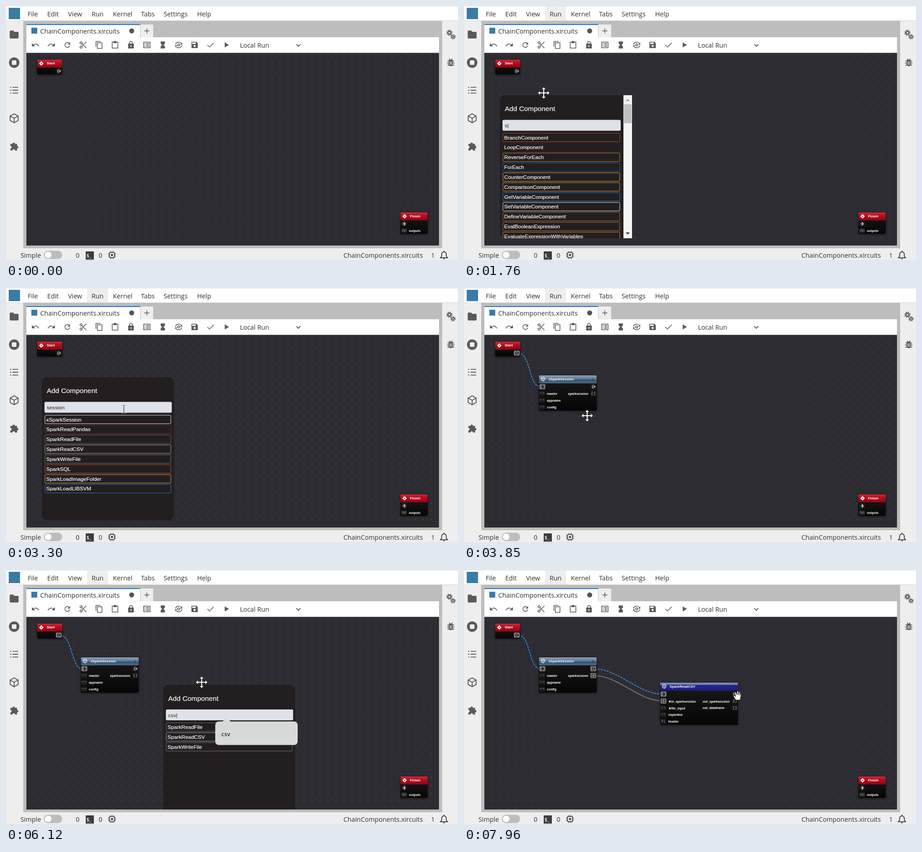
Animation of 998x561 px, one loop 8000 ms. Source, as an HTML page:

```html
<!DOCTYPE html>
<html lang="en">
<head>
<meta charset="utf-8">
<title>Chaining components</title>
<style>
html, body { margin: 0; height: 100%; overflow: hidden; background: #eee; }
svg { display: block; }
.ui { font: 14.3px "Open Sans", "Noto Sans", sans-serif; fill: #303030; }
.list { font: 11.67px "Liberation Sans", Arial, sans-serif; fill: #fff; stroke: #fff; stroke-width: .2px; }
.node { font: bold 7px "Liberation Sans", Arial, sans-serif; fill: #fff; }
.node .name { font-size: 7.8px; }
.shadow { filter: drop-shadow(0 1px 2px rgba(0, 0, 0, .7)); }
</style>
</head>
<body>
<svg id="stage" width="998" height="561" viewBox="0 0 998 561">
  <defs>
    <pattern id="dots" x="52.2" y="98.4" width="17.56" height="17.56" patternUnits="userSpaceOnUse">
      <circle cx="8.8" cy="8.8" r="1.1" fill="#4b4a50"/>
    </pattern>
    <linearGradient id="red" x2="0" y2="1"><stop stop-color="#d02a3c"/><stop offset=".35" stop-color="#b90f20"/><stop offset="1" stop-color="#8c0613"/></linearGradient>
    <linearGradient id="slate" x2="0" y2="1"><stop stop-color="#8da3b8"/><stop offset=".45" stop-color="#5e7a96"/><stop offset=".6" stop-color="#36506b"/><stop offset="1" stop-color="#4f6e8e"/></linearGradient>
    <linearGradient id="navy" x2="0" y2="1"><stop stop-color="#8497bd"/><stop offset=".22" stop-color="#6c80b0"/><stop offset=".32" stop-color="#25278a"/><stop offset="1" stop-color="#1d1c7c"/></linearGradient>
    <linearGradient id="body" x2="0" y2="1"><stop stop-color="#19191a"/><stop offset="1" stop-color="#060606"/></linearGradient>
  </defs>
  <g id="base"></g>
  <g id="live"></g>
</svg>
<script>
const byId = id => document.getElementById(id);
const rect = (x, y, w, h, fill, r = 0, more = '') =>
  `<rect x="${x}" y="${y}" width="${w}" height="${h}" rx="${r}" fill="${fill}" ${more}/>`;
const disc = (x, y, r, fill) => `<circle cx="${x}" cy="${y}" r="${r}" fill="${fill}"/>`;
const text = (x, y, s, cls = 'ui', more = '') => `<text x="${x}" y="${y}" class="${cls}" ${more}>${s}</text>`;
const line = (d, color, width, more = '') =>
  `<path d="${d}" fill="none" stroke="${color}" stroke-width="${width}" ${more}/>`;
const ring = (x, y, r) => `M${x - r} ${y}a${r} ${r} 0 1 0 ${2 * r} 0a${r} ${r} 0 1 0 ${-2 * r} 0z`;

// Icons live on a 24 unit grid: [filled part, stroked part]
const icon = (x, y, [fill, stroke], scale = .78, color = '#5a5a5a', width = 2) =>
  `<g transform="translate(${x} ${y}) scale(${scale}) translate(-12 -12)">` +
  `<path d="${fill}" fill="${color}" fill-rule="evenodd"/>${line(stroke, color, width)}</g>`;

const toolbar = [
  ['M2 7v9h9z', 'M5 13C10 8 18 8 21.500 16'],
  ['M22 7v9h-9z', 'M19 13C14 8 6 8 2.500 16'],
  ['M20 4v7h-7z', 'M17 7A7 7 0 1 0 19 14'],
  ['', 'M8 8L21 21M8 16L21 3' + ring(6, 6, 3) + ring(6, 18, 3)],
  ['', 'M3 17V2H16M7 6H20V22H7z'],
  ['M8 1h8v6H8z', 'M4 4H20V21H4z'],
  ['M4 8H20V22H4z' + ring(12, 15, 2), 'M8 9V6a4 4 0 0 1 8 0V9'],
  ['', 'M3 4H21V20H3zM6 8h2M10 8h8M6 12h2M10 12h8M6 16h2M10 16h8'],
  ['M6 2H18V8L14 12L18 16V22H6V16L10 12L6 8z', ''],
  ['M22 5v6h-6zM2 19v-6h6z', 'M3 11a9 8 0 0 1 16-4M21 13a9 8 0 0 1-16 4' + ring(12, 12, 3)],
  ['M3 3H17L21 7V21H3zM5 5V9H15V5z' + ring(12, 15, 3), ''],
  ['', 'M3 12l6 6L21 6'],
  ['M7 5v14l12-7z', '']
];
const gear = (x, y, r) => disc(x, y, r, '#5a5a5a') +
  `<circle cx="${x}" cy="${y}" r="${r + 1}" fill="none" stroke="#5a5a5a" stroke-width="2.4" stroke-dasharray="${(r + 1) * Math.PI / 8}"/>` +
  disc(x, y, r * .45, '#eee');
const cube = ['', 'M12 2L21 7V17L12 22L3 17V7zM3 7L12 12L21 7M12 12V22'];

function chrome() {
  const menu = { File: 48, Edit: 91, View: 137, Run: 189, Kernel: 236, Tabs: 298, Settings: 348, Help: 422 };
  return rect(0, 0, 998, 561, '#eee') + rect(0, 0, 998, 32, '#fff') + rect(0, 0, 998, 1, '#e3e3e3') +
    rect(0, 32, 998, 1, '#d5d5d5') + rect(38, 33, 925, 502, '#bdbdbd') +
    `<g id="run">${rect(179, 1, 46, 31, '#eee')}</g>` +
    Object.entries(menu).map(([s, x]) => text(x, 22.5, s)).join('') +
    rect(6, 4, 25, 25, '#3a7ca5') +
    rect(45, 40, 251, 30, '#fff') + rect(45, 40, 251, 2, '#1976d2') + rect(297, 41, 28, 28, '#eee') +
    rect(56, 48, 13, 13, '#3a7ca5') + text(75.5, 60.500, 'ChainComponents.xircuits') + disc(277.5, 55, 5.5, '#555') +
    line('M305.500 55H316.500M311 49.500V60.500', '#555', 1.4) +
    rect(45, 69, 911, 35, '#fff') +
    toolbar.map((p, i) => icon(65 + 35.15 * i, 86, p)).join('') +
    text(516.5, 91.5, 'Local Run') + line('M641 84.500l4.500 4.500 4.500-4.500', '#444', 1.7) +
    rect(45, 103.500, 911, 425.5, '#2d2c32') + rect(45, 103.500, 911, 425.5, 'url(#dots)') +
    sidebars() + status();
}

function sidebars() {
  return icon(18, 63, ['M2 5q0-2 2-2h6l2 3h8q2 0 2 2v11q0 2-2 2H4q-2 0-2-2z', ''], .98) +
    disc(18, 125, 11.5, '#5a5a5a') + rect(13, 120, 10, 10, '#eee', 1.5) +
    icon(18, 186, ['', 'M2 5h3M8 5h14M2 12h3M8 12h14M2 19h3M8 19h14'], .9) + icon(18, 248, cube, .98) +
    icon(18, 310, ['M3 6h5a3 3 0 1 1 6 0h5v5a3 3 0 1 1 0 6v5h-5a3 3 0 1 0-6 0H3v-5a3 3 0 1 0 0-6z', ''], .93) +
    gear(979, 59, 4.500) + gear(987, 68, 3.6) +
    icon(982, 125, ['M7 7q5-4 10 0v10q-5 8-10 0zM9 10v2h6v-2zM9 14v2h6v-2z',
      'M4 8H20M3 13H21M4 18H20M8 3l3 3M16 3l-3 3'], .92);
}

function status() {
  return text(32, 555.500, 'Simple') + rect(83.5, 540.500, 40.5, 18.5, '#bdbdbd', 9) + disc(93, 549.700, 7.3, '#fff') +
    text(154, 555.500, '0') + rect(176, 542, 18, 18, '#3c3c3c') +
    text(178, 555, '$_', 'ui', 'style="font-size:10px;fill:#fff;font-weight:600"') + text(204.5, 555.500, '0') +
    icon(234, 550, [ring(12, 12, 3), 'M5 5H19V19H5zM9 1V5M15 1V5M9 19V23M15 19V23M1 9H5M1 15H5M19 9H23M19 15H23'], .78, '#333') +
    text(745, 555.500, 'ChainComponents.xircuits') + text(938.5, 555.500, '1') +
    icon(967, 550, ['M9 21h6q-3 4-6 0z', 'M3 19H21L18 15V10a6 6 0 0 0-12 0V15zM12 4V1'], .86, '#333');
}

const glyphs = {
  in: 'M-3.500 0H1.500M-.5-2L1.500 0L-.5 2M-1-3.500a3.500 3.500 0 1 1 0 7',
  out: 'M-1 0H4M2-2L4 0L2 2M1-3.500a3.500 3.500 0 1 0 0 7',
  str: 'M-4-2v2M-2-2v2M2-2v2M4-2v2',
  box: 'M-1-3H-3V3H-1M1-3H3V3H1',
  list: 'M-3-2.500H-4V2.500H-3M-1-2H1V2H-1zM3-2.500H4V2.500H3',
  bool: 'M-4-2H-1M-2.500-2V2M2-2V2H4'
};
const port = (x, y, kind, on) => `<g transform="translate(${x} ${y})">` +
  rect(-6.500, -5.800, 13, 11.6, on ? '#77777a' : '#1c1c1d', 2) +
  line(glyphs[kind], on ? '#111' : 'in out'.includes(kind) ? '#ddd' : '#929292', on || 'in out'.includes(kind) ? 1.1 : .9) + '</g>';

function node(x, y, w, h, color, name, labels, ports) {
  const red = color == 'red';
  const badge = red
    ? `<path d="M${x + 9} ${y + 3.500}l5 5-5 5-5-5z" fill="#fff"/>` + line(`M${x + 7.5} ${y + 8.5}h3M${x + 9} ${y + 7}v3`, '#b00', .9)
    : icon(x + 9, y + 8, cube, .45, '#fff', 2.3) + text(x + 119 + w - 128, y + 11, 'i', 'name', 'fill="#111"');
  return `<g class="node"><g class="shadow">${rect(x, y, w, h, 'url(#body)', 2.5)}</g>` +
    rect(x, y, w, 17.5, `url(#${color})`, 2) + badge + text(x + 21, y + 10.7, name, 'name') +
    ports.map(p => port(...p)).join('') + labels.map(([lx, ly, s]) => text(lx, ly + 2.7, s, '')).join('') + '</g>';
}
const startNode = on => node(69, 118.500, 55, 32.5, 'red', 'Start', [], [[116.5, 143.700, 'out', on]]);
const finishNode = () => node(871, 456, 60, 47, 'red', 'Finish', [[889.5, 496, 'outputs']],
  [[879, 481, 'in'], [879, 496, 'list']]);
const sessionNode = (flow, data) => node(165.5, 193, 127.5, 77.5, 'slate', 'xSparkSession',
  [[183, 233.500, 'master'], [183, 248.400, 'appname'], [183, 263.300, 'config'], [229.5, 233.500, 'sparksession']],
  [[173, 218, 'in', 1], [285.5, 218, 'out', flow], [285.5, 233, 'box', data],
    ...[233, 248, 263].map(y => [172.5, y, 'str'])]);
const csvNode = () => node(433, 249, 172, 92.5, 'navy', 'SparkReadCSV',
  [[451, 290, '★in_sparksession'], [451, 305, '★file_input'], [451, 319.500, 'separator'], [451, 334, 'header'],
    [527, 290, 'out_sparksession'], [527, 304.500, 'out_dataframe']],
  [[440.5, 274, 'in', 1], [440.5, 289.500, 'box', 1], [440, 305, 'str'], [440, 319.500, 'str'], [440, 334, 'bool'],
    [597.5, 274, 'out'], [598, 289.500, 'box'], [598, 304.500, 'box']]);

function link(x1, y1, x2, y2, t, color = '#2f83d2') {
  const bend = Math.min(48, Math.abs(x2 - x1) * .52);
  const dash = color[1] == '2' ? `stroke-dasharray="5 1.800" stroke-dashoffset="${-t * .02 % 6.8}"` : '';
  return line(`M${x1} ${y1}C${x1 + bend} ${y1 + (y2 - y1) * .04} ${x2 - bend} ${y2 - (y2 - y1) * .04} ${x2} ${y2}`, color, 2.1, dash);
}

const everything = [['BranchComponent', '#b0452f'], ['LoopComponent', '#2e292a'], ['ReverseForEach', '#c98532'],
  ['ForEach', '#1f62b8'], ['CounterComponent', '#dca058'], ['ComparisonComponent', '#d29145'],
  ['GetVariableComponent', '#2f83c4'], ['SetVariableComponent', '#e6e2da'], ['DefineVariableComponent', '#a56b3c'],
  ['EvalBooleanExpression', '#b27436'], ['EvaluateExpressionWithVariables', '#c08a48']];
const sessionHits = [['xSparkSession', '#d9dfe8'], ['SparkReadPandas', '#84213a'], ['SparkReadFile', '#6a6667'],
  ['SparkReadCSV', '#95a6bd'], ['SparkWriteFile', '#757273'], ['SparkSQL', '#b0572f'],
  ['SparkLoadImageFolder', '#dda250'], ['SparkLoadLIBSVM', '#2f79bd']];
const csvHits = [2, 3, 4].map(i => sessionHits[i]);

function panel(x, y, typed, hits, caret, hint) {
  const rows = typed.length < 2 ? everything : hits;
  const scroll = rows == everything, w = scroll ? 261 : 281;
  let s = `<svg x="${x}" y="${y}" width="292" height="${Math.min(316, 529 - y)}">` +
    rect(0, 0, 292, 316, '#231f20', 12) +
    text(11, 35, 'Add Component', 'list', 'style="font-size:15.4px"') + rect(6, 54.500, w, 24, '#dfe2e8', 3) +
    text(11, 71, typed + (caret ? '|' : ''), 'list', 'style="fill:#222;stroke:none"') +
    rows.map(([name, color], i) => rect(7, 84 + 21.85 * i, w - 3, 18.7, 'none', 1.5, `stroke="${color}"`) +
      text(9.8, 97.5 + 21.85 * i, name, 'list')).join('');
  if (scroll) s += rect(273, 0, 19, 316, '#f4f4f4') + rect(274, 20, 17, 42, '#c1c1c1') +
    '<path d="M278 13l4.500-5 4.500 5z" fill="#a0a0a0"/><path d="M278 303l4.500 5 4.500-5z" fill="#444"/>';
  s += '</svg>';
  if (hint) s += `<g transform="translate(${x + 115} ${y + 81})"><g opacity=".96" fill="#dfe0e0">` +
    `<path d="M15 1l10-9 10 9z"/>${rect(0, 0, 182, 52, '#dfe0e0', 8)}</g>` +
    text(13.5, 32, hint, 'ui', 'style="font-size:13px;font-weight:600"') + '</g>';
  return s;
}

// Pointer track: time, x, y and the shape used until the next entry
const track = [[380, 202, 8, 'arrow'], [520, 180, 60, 'arrow'], [640, 150, 108, 'move'], [800, 116, 143, 'hand'],
  [1070, 116, 143, 'move'], [1440, 176, 192, 'move'], [3090, 176, 192, 'move'], [3160, 204, 217, 'arrow'],
  [3230, 232, 254, 'beam'], [3300, 260, 267, 'beam'], [3370, 268, 284, 'hand'], [3450, 272, 289, 'hand'],
  [3600, 272, 289, 'move'], [3800, 272, 282, 'move'], [3920, 272, 282, 'move'], [4250, 285, 219, 'hand'],
  [4440, 285, 219, 'move'], [4680, 307, 222, 'move'], [4750, 307, 222, 'move'], [5500, 432, 248, 'move'],
  [6400, 432, 248, 'move'], [6470, 440, 278, 'arrow'], [6560, 462, 318, 'beam'], [6640, 490, 345, 'hand'],
  [6760, 520, 364, 'hand'], [7000, 520, 364, 'move'], [7150, 524, 358, 'move'], [7240, 524, 358, 'move'],
  [7480, 548, 330, 'hand'], [7850, 602, 276, 'hand'], [7950, 604, 277, 'hand'], [8000, 604, 277, 'hand']];
function pointer(t) {
  const i = track.findIndex(k => k[0] > t) - 1, [a, b] = [track[i], track[i + 1]];
  const f = (t - a[0]) / (b[0] - a[0]);
  return { x: a[1] + (b[1] - a[1]) * f, y: a[2] + (b[2] - a[2]) * f, shape: a[3] };
}

const shapes = {
  arrow: 'M0 0V17L4 13.500L7 20L10 18.500L7 12.500H12z',
  move: 'M0-13l5 5H1.500V-1.500H8V-5l5 5-5 5V1.500H1.500V8H5l-5 5-5-5h3.500V1.500H-8V5l-5-5 5-5v3.500h6.500V-8H-5z',
  hand: 'M-4 10L-9 2Q-9-1-6 1L-4 3L-6-6Q-4-8-3-6L-1-1V-9Q1-11 2-9V-1L4-8Q6-9 6-7L5 0L7-4Q9-4 8-2L6 8V10z',
  beam: 'M-5-9H-1L0-8L1-9H5V-7.500H1V7.500H5V9H1L0 8L-1 9H-5V7.500H-1V-7.500H-5z'
};
function drawPointer({ x, y, shape }, pressed) {
  const beam = shape == 'beam';
  const fill = pressed ? '#fcd7a4' : beam ? '#111' : '#fff';
  const edge = pressed ? '#c58038' : beam ? '#fff' : '#111';
  return (pressed ? disc(x, y, 14, '#c17a2b') : '') +
    `<path transform="translate(${x} ${y})" d="${shapes[shape]}" fill="${fill}" stroke="${edge}" stroke-width=".8"/>`;
}

const within = (t, a, b) => t >= a && t < b;
const type = (word, t, start, step) => word.slice(0, Math.max(0, Math.floor((t - start) / step) + 1));

function scene(t) {
  const p = t >= 380 && pointer(t);
  const drag1 = within(t, 1070, 1500), drag2 = within(t, 4440, 5660);
  const session = t >= 3600, csv = t >= 7000;
  let s = '';
  if (drag1) s += link(123, 144.500, p.x, p.y, t);
  if (session) s += link(123, 145, 167, 218, t);
  if (drag2) s += link(292, 218, p.x, p.y, t);
  if (csv) s += link(292, 218.500, 434, 274, t) + link(292, 233.500, 434, 289, t, '#6d6d6f');
  s += startNode(drag1 || session) + finishNode();
  if (session) s += sessionNode(drag2 || csv, csv);
  if (csv) s += csvNode();
  if (within(t, 1540, 3600)) {
    const typed = t < 1950 ? type('s', t, 1750, 90) : 's' + type('ession', t, 1950, 100);
    s += panel(79, 197, typed, sessionHits, t < 3090, within(t, 2050, 3130) && 'session');
  }
  if (within(t, 5740, 7000))
    s += panel(347, 253.500, type('csv', t, 5860, 90), csvHits, t < 6400, within(t, 5960, 6450) && 'csv');
  const pressed = drag1 || drag2 || within(t, 3480, 3640) || within(t, 6850, 7040);
  return s + (p ? drawPointer(p, pressed) : '');
}

byId('base').innerHTML = chrome();
const begin = performance.now();
function draw() {
  const t = Math.max(0, performance.now() - begin) % 8000;
  byId('run').setAttribute('opacity', t < 400 ? 0 : 1);
  byId('live').innerHTML = scene(t);
  requestAnimationFrame(draw);
}
draw();
</script>
</body>
</html>
```
